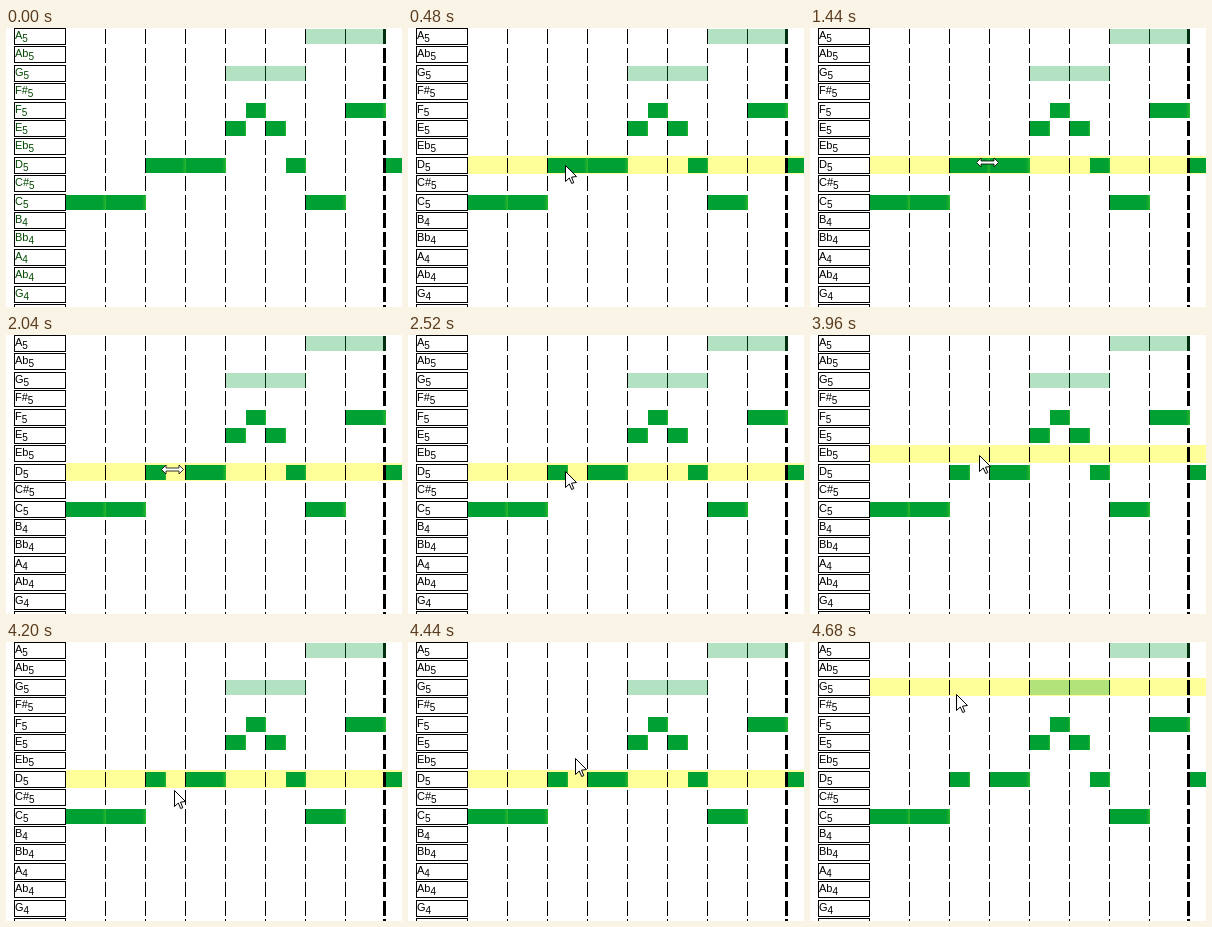
Write an HTML page that moves like this. It is 396 by 279 pixels and loops after 4.8 s.

```html
<!DOCTYPE html>
<html lang="en">
<head>
<meta charset="utf-8">
<title>Piano roll</title>
<style>
  html, body { margin: 0; width: 100%; height: 100%; overflow: hidden; background: #fff; }
  svg { display: block; width: 396px; height: 279px; }
  rect { shape-rendering: crispEdges; }
  text { font: 11px "Liberation Sans", Arial, sans-serif; }
</style>
</head>
<body>
<svg id="stage" viewBox="0 0 396 279">
  <defs>
    <linearGradient id="solid">
      <stop offset=".9" stop-color="#00a033"/>
      <stop offset="1" stop-color="#2cb82c"/>
    </linearGradient>
  </defs>
  <rect id="highlight" x="60" width="336" fill="#ff9"/>
  <g id="grid"></g>
  <g id="notes"></g>
  <g id="labels"></g>
  <path id="arrow" d="M.5 .5V16.5L4.3 13L6.7 18.5L8.8 17.6L6.5 12.2L11.5 11.5Z"
        fill="#fff" stroke="#000"/>
  <path id="resize" d="M-11 0L-6.5 -4.5V-1.5H6.5V-4.5L11 0L6.5 4.5V1.5H-6.5V4.5Z"
        fill="#fff" stroke="#000" stroke-width=".8"/>
</svg>
<script>
const STEP = 120, LOOP = 4800, PITCH = 18.4;
const names = ['A5', 'Ab5', 'G5', 'F#5', 'F5', 'E5', 'Eb5', 'D5', 'C#5',
               'C5', 'B4', 'Bb4', 'A4', 'Ab4', 'G4', 'F#4'];
const $ = id => document.getElementById(id);
const rowTop = row => Math.round(PITCH * row - 0.8);

function add(parent, tag, attrs) {
  const el = document.createElementNS('http://www.w3.org/2000/svg', tag);
  for (const key in attrs) el.setAttribute(key, attrs[key]);
  return $(parent).appendChild(el);
}

function note(name, x, width, faint) {
  return add('notes', 'rect', {
    x, y: rowTop(names.indexOf(name)) + 2, width, height: 15,
    fill: faint ? '#00a033' : 'url(#solid)', 'fill-opacity': faint ? 0.3 : 1
  });
}

names.forEach((name, row) => {
  const y = Math.round(PITCH * row);
  for (let x = 99; x < 396; x += 40) {
    const bar = x === 379;
    add('grid', 'rect', { x: bar ? 377 : x, y: rowTop(row) + 2, width: bar ? 3 : 1, height: 15 });
  }
  add('labels', 'rect', { x: 8.5, y: y + 0.5, width: 51, height: 16, fill: '#fff', stroke: '#000' });
  const label = add('labels', 'text', { x: 9, y: y + 11 });
  label.textContent = name.slice(0, -1);
  const octave = document.createElementNS(label.namespaceURI, 'tspan');
  octave.setAttribute('dy', 3);
  octave.setAttribute('font-size', 10);
  octave.textContent = name.slice(-1);
  label.append(octave);
});

note('A5', 300, 80, true);
note('G5', 220, 80, true);
note('F5', 240, 20);
note('F5', 340, 40);
note('E5', 220, 20);
note('E5', 260, 20);
note('D5', 180, 40);
note('D5', 280, 20);
note('D5', 380, 40);
note('C5', 60, 40);
note('C5', 100, 40);
note('C5', 300, 40);
const resized = note('D5', 140, 40);
const added = note('E5', 160, 20);

// Pointer poses: step, x, y, highlighted row, pointer shape
const poses = [
  [1, 150, 22, 'Ab5'], [2, 152, 75, 'F5'], [3, 155, 118, 'Eb5'], [4, 157, 137, 'D5'],
  [5, 156, 137, 'D5'], [7, 160, 137, 'D5'], [8, 166, 136, 'D5'], [9, 172, 135, 'D5'],
  [10, 176, 134, 'D5'],
  [12, 177.5, 134.5, 'D5', 'resize'], [13, 178.5, 134.5, 'D5', 'resize'],
  [15, 174.5, 134.5, 'D5', 'resize'], [16, 170.5, 134.5, 'D5', 'resize'],
  [17, 166.5, 134.5, 'D5', 'resize'], [18, 163.5, 134.5, 'D5', 'resize'],
  [19, 156, 136, 'D5'], [21, 157, 136, 'D5'], [22, 160, 126, 'D5'],
  [23, 165, 108, 'Eb5'], [24, 168, 98, 'E5'],
  [32, 168, 108, 'E5'], [33, 169, 120, 'Eb5'], [34, 169, 138, 'D5'], [35, 168, 148, 'D5'],
  [36, 168, 138, 'D5'], [37, 167, 116, 'D5'], [38, 158, 84, 'F5'], [39, 146, 52, 'G5']
];

const show = (el, on) => el.setAttribute('visibility', on ? 'visible' : 'hidden');

function draw(time) {
  const step = Math.floor(time % LOOP / STEP);
  const pose = poses.filter(p => p[0] <= step).pop();
  const shape = pose && (pose[4] || 'arrow');
  for (const id of ['arrow', 'resize']) show($(id), id === shape);
  show($('highlight'), pose);
  if (pose) {
    const [, x, y, name] = pose, row = names.indexOf(name);
    $(shape).setAttribute('transform', `translate(${x} ${y})`);
    $('highlight').setAttribute('y', rowTop(row));
    $('highlight').setAttribute('height', rowTop(row + 1) - rowTop(row));
  }
  for (const text of document.querySelectorAll('text')) text.setAttribute('fill', pose ? '#000' : '#004800');
  resized.setAttribute('width', step < 17 ? 40 : 20);
  show(added, step >= 26 && step < 31);
}

const start = performance.now();
(function tick() {
  draw(performance.now() - start);
  requestAnimationFrame(tick);
})();
</script>
</body>
</html>
```
